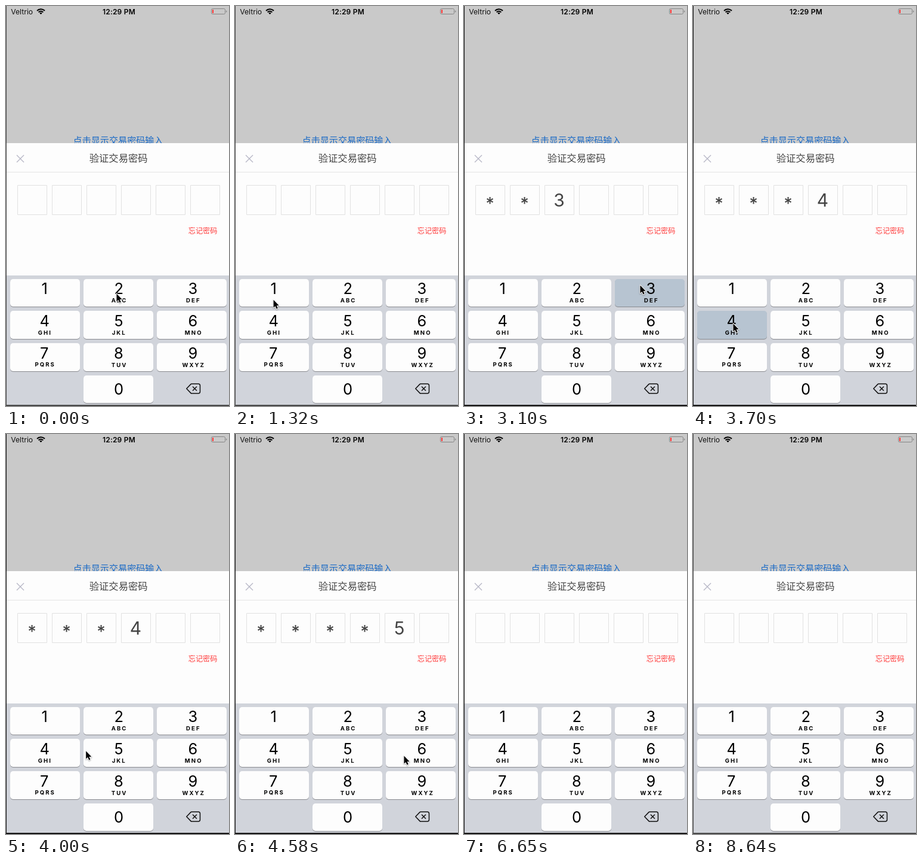
Animation of 374x668 px, one loop 8.74 s. Source, as an HTML page with a canvas:

```html
<!DOCTYPE html>
<html lang="zh-CN">
<head>
<meta charset="utf-8">
<title>验证交易密码</title>
<style>
html, body { margin: 0; width: 100%; height: 100%; overflow: hidden; background: #c9c9c9; }
canvas { display: block; }
</style>
</head>
<body>
<canvas id="stage" width="374" height="668"></canvas>
<script>
const LOOP = 8740, TICK = 147.5;
const ctx = document.getElementById('stage').getContext('2d');
const LATIN = 'Inter, Roboto, sans-serif';
const HAN = '"Noto Sans CJK SC", "Noto Sans CJK", sans-serif';
const LETTERS = ['', '', 'ABC', 'DEF', 'GHI', 'JKL', 'MNO', 'PQRS', 'TUV', 'WXYZ'];

// Pointer stops: arrival tick, x, y and the digit tapped there
const STOPS = [
  [0, 185, 480], [3, 102, 499], [10, 63, 490],
  [14, 67, 487, 1], [18, 185, 471, 2], [21, 295, 466, 3],
  [25, 67, 530, 4], [29, 187, 528, 5], [32, 315, 540, 6],
  [37, 315, 540], [41, 287, 598], [42, 287, 598], [45, 334, 672]];
const TAPS = STOPS.filter(s => s[3]);
const CLEAR = 35;

function rect(x, y, w, h, color, r = 0) {
  ctx.fillStyle = color;
  ctx.beginPath();
  ctx.roundRect(x, y, w, h, r);
  ctx.fill();
}

function stroke(color, width) {
  ctx.strokeStyle = color;
  ctx.lineWidth = width;
  ctx.stroke();
}

function cross(x, y, r, color, width) {
  ctx.beginPath();
  for (const s of [-1, 1]) {
    ctx.moveTo(x - r, y - r * s);
    ctx.lineTo(x + r, y + r * s);
  }
  stroke(color, width);
}

// Text whose ink is centred on cx, cy
function text(str, cx, cy, font, color, spacing = 0) {
  ctx.font = font;
  ctx.letterSpacing = spacing + 'px';
  ctx.fillStyle = color;
  const m = ctx.measureText(str);
  ctx.fillText(str,
    cx - (m.actualBoundingBoxRight - m.actualBoundingBoxLeft) / 2,
    cy + (m.actualBoundingBoxAscent - m.actualBoundingBoxDescent) / 2);
}

function statusBar() {
  text('Veltrio', 26.5, 9.3, '400 12.2px ' + LATIN, '#111');
  for (const r of [1.5, 5.2, 8.8]) {
    ctx.beginPath();
    ctx.arc(58.5, 14, r, -Math.PI * 0.76, -Math.PI * 0.24);
    stroke('#000', r < 2 ? 3 : 2.1);
  }
  text('12:29 PM', 189.3, 9.3, '600 12px ' + LATIN, '#000', 0.2);
  ctx.beginPath();
  ctx.roundRect(344.5, 4.5, 23, 9, 2);
  stroke('#858585', 1);
  rect(346, 6, 2, 6, '#f33', 0.5);
  rect(369, 7.5, 1.3, 3, '#858585', 0.6);
}

function sheet(n) {
  rect(0, 229, 374, 221, '#fdfdfd');
  cross(24, 255, 6, '#b7b7c6', 1.4);
  text('验证交易密码', 188.5, 254.3, '400 16.3px ' + HAN, '#444');
  rect(0, 277, 374, 1, '#e4e4e4');
  const typed = n < CLEAR ? TAPS.filter(s => s[0] <= n) : [];
  const shake = [-5, -8][n - CLEAR] || 0;
  for (let i = 0; i < 6; i++) {
    const x = 19 + 58 * i + shake;
    ctx.beginPath();
    ctx.rect(x + 0.5, 299.5, 49, 49);
    stroke('#e1e1e1', 1);
    if (i === typed.length - 1) text(String(i + 1), x + 24.3, 324, '400 30px ' + LATIN, '#444');
    else if (i < typed.length) text('*', x + 24.3, 324.5, '500 28px ' + LATIN, '#444');
  }
  text('忘记密码', 330, 374.5, '400 12.2px ' + HAN, '#ff3c3c');
}

function key(digit, col, row, n) {
  const x = 7 + 123 * col, top = 455.6 + 53.8 * row;
  const y = Math.round(top), h = Math.round(top + 46.4) - y;
  const cx = 64.5 + 124.5 * col;
  const down = TAPS.some(s => s[3] === digit && s[0] === n);
  rect(x, y + 1, 117, h, '#898b90', 5);
  rect(x, y, 117, h, down ? '#b7c4d1' : '#fdfdfd', 5);
  text(String(digit), cx, top + (digit ? 16.1 : 22.4), '400 25.5px ' + LATIN, '#000');
  text(LETTERS[digit], cx, top + 35.8, '700 9.6px ' + LATIN, '#000', 2);
}

function keypad(n) {
  rect(0, 450, 374, 218, '#d1d4db');
  for (let i = 0; i < 9; i++) key(i + 1, i % 3, Math.floor(i / 3), n);
  key(0, 1, 3, n);
  ctx.beginPath();
  ctx.moveTo(302.8, 639);
  ctx.arcTo(310.5, 631, 314, 631, 2);
  ctx.arcTo(325.5, 631, 325.5, 639, 3);
  ctx.arcTo(325.5, 647, 318, 647, 3);
  ctx.arcTo(310.5, 647, 302.8, 639, 2);
  ctx.closePath();
  ctx.lineJoin = 'round';
  stroke('#111', 1.5);
  cross(316.5, 639, 3.5, '#111', 1.5);
}

function pointer(n) {
  const i = STOPS.findLastIndex(s => s[0] <= n);
  const [t0, x0, y0] = STOPS[i];
  const [t1, x1, y1] = STOPS[i + 1] || STOPS[i];
  // Rest one tick, then glide to the next stop, slowing down
  const p = Math.max(0, n - t0 - 1) / Math.max(1, t1 - t0 - 1);
  const k = 1 - (1 - p) ** 2;
  ctx.save();
  ctx.translate(x0 + (x1 - x0) * k + 0.5, y0 + (y1 - y0) * k + 0.5);
  const arrow = new Path2D('M0 0V13L3 10.4 5 15 7.2 14 5.2 9.6H9.2Z');
  ctx.shadowColor = 'rgba(0,0,0,.35)';
  ctx.shadowBlur = 2;
  ctx.shadowOffsetY = 1;
  ctx.strokeStyle = '#fff';
  ctx.lineWidth = 2;
  ctx.stroke(arrow);
  ctx.shadowColor = 'transparent';
  ctx.fillStyle = '#000';
  ctx.fill(arrow);
  ctx.restore();
}

function draw(t) {
  const n = Math.floor(t / TICK + 0.06);
  rect(0, 0, 374, 668, '#c9c9c9');
  statusBar();
  text('点击显示交易密码输入', 188, 224.3, '400 15.1px ' + HAN, '#1a6ac6');
  sheet(n);
  keypad(n);
  const edge = n < 14 || t >= 8640 ? '#484848' : '#141414';
  rect(0, 0, 1, 668, edge);
  rect(0, 666, 374, 2, edge);
  pointer(n);
}

const start = performance.now();
function tick() {
  draw((performance.now() - start) % LOOP);
  requestAnimationFrame(tick);
}
tick();
</script>
</body>
</html>
```
